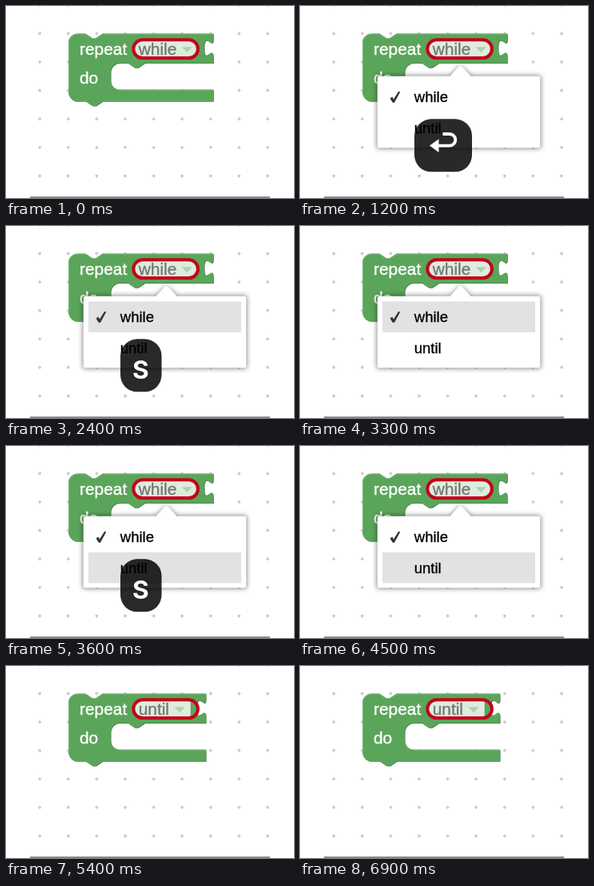
These frames come from a looping animation (360x240 px, 7.2 s). An HTML page:

```html
<!DOCTYPE html>
<html lang="en">
<head>
<meta charset="utf-8">
<title>Repeat block dropdown</title>
<style>
  html, body { margin: 0; width: 100%; height: 100%; overflow: hidden; background: #fff; }
  svg { display: block; width: 360px; height: 240px; }
  text { font-family: "Liberation Sans", Arial, sans-serif; }
  .label { font-size: 20.9px; stroke-width: .4; }
  .item { font-size: 18.5px; stroke-width: .3; }
  .letter { font: 700 31.5px Inter, sans-serif; }
</style>
</head>
<body>
<svg viewBox="0 0 360 240">
  <defs>
    <clipPath id="view"><rect x="30" width="300" height="240"/></clipPath>
    <clipPath id="pill"><rect x="159.3" y="42.3" width="80.6" height="22.8" rx="11.4"/></clipPath>
    <filter id="blur" x="-20%" y="-20%" width="140%" height="140%"><feGaussianBlur stdDeviation="3.3"/></filter>
  </defs>
  <rect width="360" height="240" fill="#fff"/>
  <g clip-path="url(#view)">
    <path id="grid" stroke="#c8c8c8" stroke-width="1.6" fill="none"/>
    <rect x="30" y="238.4" width="300" height="1.3" fill="#555"/>

    <g transform="translate(78 34.4) scale(1.424)">
      <path id="shade" transform="translate(.6 .6)" fill="#498449"/>
      <path id="block" fill="#5ba55b"/>
      <path id="shine" fill="none" stroke="#8cc08c" stroke-width=".6"/>
    </g>
    <g class="label" fill="#fff" stroke="#fff">
      <text x="92" y="60.8">repeat</text>
      <text x="92" y="96.8">do</text>
    </g>
    <rect id="field" x="159.3" y="42.3" height="22.8" fill="#deedde" clip-path="url(#pill)"/>
    <text id="value" class="label" x="165.7" y="60.8" fill="#777" stroke="#777"></text>
    <path id="arrow" d="M219.5 51.2h13.5l-6.7 7z" fill="#b0d3b0"/>
    <rect x="159.3" y="42.3" width="80.6" height="22.8" rx="11.4" fill="none" stroke="#c4001a" stroke-width="4"/>

    <g id="menu">
      <path d="M96 87H187L200.5 75L214 87H301V178H96Z" fill="#000" opacity=".48" filter="url(#blur)"/>
      <path d="M99 88H187.5L198.3 76Q200.5 73.8 202.7 76L213.5 88H298Q300 88 300 90V175Q300 177 298 177H99Q97 177 97 175V90Q97 88 99 88Z"
        fill="#fff" stroke="#fff" stroke-width=".5"/>
      <rect id="active" x="103" width="191" height="38.5" fill="#e2e2e2"/>
      <path d="M112.6 115.4L115.3 113.4L117 116.6L123.2 106.8L125.2 107.4L118 120.8H115.8Z" fill="#333"/>
      <g class="item" fill="#000" stroke="#000">
        <text x="142.8" y="120">while</text>
        <text x="142.8" y="158.5">until</text>
      </g>
    </g>

    <g id="key">
      <rect id="cap" x="143" y="141.3" height="66" rx="21" fill="#000" fill-opacity=".84"/>
      <g id="enter">
        <path d="M178.5 160H187A7.3 7.3 0 0 1 187 174.6H170" fill="none" stroke="#fff" stroke-width="3.8"/>
        <path d="M162 174.6L173.5 166.2V183Z" fill="#fff"/>
      </g>
      <text id="letter" class="letter" x="168.3" y="190.5" text-anchor="middle" fill="#fff">S</text>
    </g>
  </g>
</svg>
<script>
  const LOOP = 7200, OPEN = 900, CLOSE = 4800, HOLD = 600;
  const presses = [[OPEN, 'enter'], [2400, 's'], [3600, 's'], [CLOSE, 'enter']];
  const $ = id => document.getElementById(id);
  const set = (id, attrs) => {
    for (const k in attrs) $(id).setAttribute(k, attrs[k]);
  };
  const show = (id, on) => set(id, { visibility: on ? 'inherit' : 'hidden' });

  // Outline in block units; w is the right edge
  const outline = w => 'M0 8A8 8 0 0 1 8 0H15l6 4h3l6-4H' + w +
    'v5c0 10-8-8-8 7.5s8-2.5 8 7.5V25.8H67l-6 4h-3l-6-4h-7a8 8 0 0 0-8 8V41.2' +
    'a8 8 0 0 0 8 8H' + w + 'V59.4H30l-6 4h-3l-6-4H8a8 8 0 0 1-8-8Z';

  const shine = w => 'M.3 51V8A7.7 7.7 0 0 1 8 .3H15l6 4h3l6-4H' + w + 'M45 49.5H' + w;

  let dots = '';
  for (let i = 0; i < 9; i++)
    for (let j = 0; j < 7; j++)
      dots += `M${42.2 + i * 35.6 - 2} ${j * 35.6 - 1.2}h4m-2-2v4`;
  set('grid', { d: dots });

  function draw(t) {
    const done = t >= CLOSE;
    const w = done ? 120.6 : 127.1;
    set('block', { d: outline(w) });
    set('shade', { d: outline(w) });
    set('shine', { d: shine(w) });
    set('field', { width: done ? 71.4 : 80.6 });
    set('arrow', { transform: `translate(${done ? -9.3 : 0} 0)` });
    $('value').textContent = done ? 'until' : 'while';

    show('menu', t >= OPEN && !done);
    show('active', t >= 2400);
    set('active', { y: t < 3600 ? 94.3 : 132.8 });

    const press = presses.find(([at]) => t >= at && t < at + HOLD);
    const enter = press && press[1] === 'enter';
    show('key', press);
    show('enter', enter);
    show('letter', !enter);
    set('cap', { width: enter ? 72 : 51.5 });
  }

  const start = performance.now();
  function tick() {
    draw((performance.now() - start) % LOOP);
    requestAnimationFrame(tick);
  }
  tick();
</script>
</body>
</html>
```
